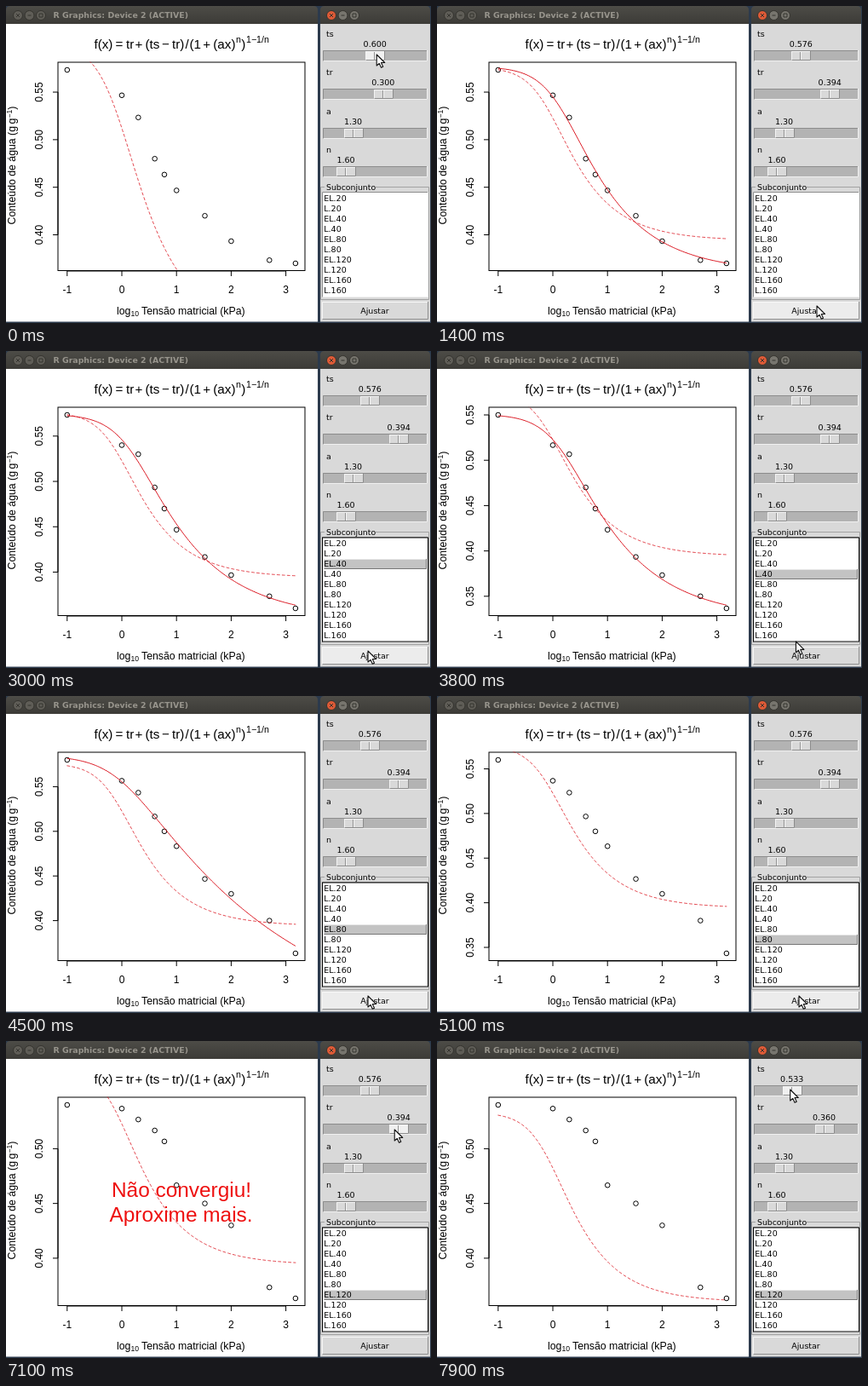
An HTML page that plays this animation: 499 by 372 pixels, repeating every 8 s.

```html
<!DOCTYPE html>
<html lang="pt">
<head>
<meta charset="utf-8">
<title>Ajuste de curva</title>
<style>
  html, body { margin: 0; width: 100%; height: 100%; overflow: hidden; background: #2c3a4c; }
  svg { display: block; width: 100vw; height: 100vh; }
  .plot text { font: 12px "Liberation Sans", Arial, sans-serif; }
  .plot .label { font-size: 12.3px; }
  .plot .small { font-size: 8.6px; }
  .plot .formula { font-size: 15.2px; }
  .plot .formula .sup { font-size: 10.6px; }
  .plot .alert { font-size: 24.4px; fill: #ee1010; }
  .panel text { font: 9.5px "DejaVu Sans", sans-serif; }
  .panel .group { font-size: 9.3px; }
  .title { font: bold 9.4px "DejaVu Sans", sans-serif; fill: #98958d; }
  .mid { text-anchor: middle; }
  .line { fill: none; stroke: #000; }
  .curve { fill: none; stroke: #dc1c26; }
  .dash { stroke-width: .8; stroke-dasharray: 3 3; stroke-linecap: round; }
</style>
</head>
<body>
<svg viewBox="0 0 499 372" xmlns="http://www.w3.org/2000/svg">
  <defs>
    <linearGradient id="bar" x2="0" y2="1">
      <stop stop-color="#4d4c47"/><stop offset="1" stop-color="#3c3b37"/>
    </linearGradient>
    <clipPath id="box"><rect x="61" y="65.500" width="290" height="245"/></clipPath>
  </defs>

  <path d="M0 21V5Q0 0 5 0H361Q366 0 366 5V21Z" fill="url(#bar)"/>
  <text class="title" x="55.500" y="14">R Graphics: Device 2 (ACTIVE)</text>
  <g class="plot">
    <rect y="21" width="366" height="349.500" fill="#fff"/>
    <text class="formula" y="50"><tspan x="103.500">f(x)</tspan><tspan x="128.600">=</tspan><tspan x="141">tr</tspan><tspan x="151.500">+</tspan><tspan x="163.500">(ts</tspan><tspan x="183">−</tspan><tspan x="195">tr)</tspan><tspan x="210.500">/</tspan><tspan x="215.500">(1</tspan><tspan x="231.300">+</tspan><tspan x="243.300">(ax)</tspan><tspan class="sup" x="270" y="43">n</tspan><tspan x="276.300" y="50">)</tspan><tspan class="sup" x="282" y="43">1−1/n</tspan></text>
    <rect class="line" x="61" y="66" width="290" height="244.500"/>
    <g id="xaxis"></g>
    <text class="label" x="130" y="361.700">log<tspan class="small" dy="2.500">10</tspan><tspan dy="-2.500" dx="3">Tensão matricial (kPa)</tspan></text>
    <text class="label" transform="translate(11 256.500) rotate(-90)">Conteúdo de água (g<tspan dx="2.500">g</tspan><tspan class="small" dy="-4.500">−1</tspan><tspan dy="4.500">)</tspan></text>
    <g id="graph"></g>
  </g>

  <g class="panel">
    <path d="M369 21V5Q369 0 374 0H493Q498 0 498 5V21Z" fill="url(#bar)"/>
    <rect x="369" y="21" width="129" height="349.500" fill="#d9d9d9"/>
    <path d="M374 212.500H369.500V344.500H496.500V212.500H434" fill="none" stroke="#a2a2a2"/>
    <text class="group" x="376" y="216">Subconjunto</text>
    <g id="controls"></g>
  </g>
  <g id="buttons"></g>
  <path id="cursor" d="M0 0V13L3 10.300L5.300 15.300L7.500 14.300L5.300 9.500H9.500Z" fill="#fff" stroke="#111" stroke-width="1.100" stroke-linejoin="round"/>
</svg>

<script>
const LOOP = 8000, STEP = 100;
const byId = id => document.getElementById(id);
const range = (n, f) => Array.from({ length: n }, (_, i) => f(i));
const draw = (n, f) => range(n, f).join('');

const rows = [20, 40, 80, 120, 160].flatMap(k => ['EL.' + k, 'L.' + k]);
const tension = [.1, 1, 2, 4, 6, 10, 33, 100, 500, 1500];
// Measured water content in 1/300 for each EL subset; L runs slightly drier.
const water = [
  [172, 164, 157, 144, 139, 134, 126, 118, 112, 111],
  [172, 162, 159, 148, 141, 134, 125, 119, 112, 108],
  [174, 167, 163, 155, 150, 145, 134, 129, 120, 109],
  [162, 161, 158, 155, 152, 140, 135, 129, 112, 109]
].flatMap((set, i) => [set, set.map(v => v - 8 + i)])
 .map(set => set.map(v => v / 300));

// Each subset gets one turn: pick its row, move to the button, fit.
const TURN = 750, LAST = 6;
const turnAt = k => 1100 + TURN * k;
const fitAt = k => k < LAST ? turnAt(k) + 300 : Infinity;
const alertFrom = 6400, alertTo = 7200;

const tsTrack = [[0, .6], [300, .576], [7500, .576], [7900, .533]];
const trTrack = [[400, .3], [700, .394], [7100, .394], [7400, .36]];
const tsX = v => 384 + (v - .4) * 246;
const trX = v => 384 + v * 196;

const drag = (track, i, toX, y, grip) => [track[i][0], toX(track[i][1]) + grip, y];
const cursorTrack = [
  drag(tsTrack, 0, tsX, 57, 2), drag(tsTrack, 1, tsX, 57, 2),
  drag(trTrack, 0, trX, 103, 1), drag(trTrack, 1, trX, 103, 1),
  [1000, 446, 352], [turnAt(0) + 400, 446, 352],
  ...range(LAST, i => i + 1).flatMap(k => {
    const t = turnAt(k);
    return [[t, 400, 226 + 12 * k], [t + 200, 425, 352], [t + 400, 425, 352]];
  }),
  [6300, 425, 352],
  [6900, 456, 104], drag(trTrack, 2, trX, 104, -5), drag(trTrack, 3, trX, 104, -5),
  drag(tsTrack, 2, tsX, 57, -2), drag(tsTrack, 3, tsX, 57, -2)
];

function at(track, t, k = 1) {
  const i = track.findIndex(p => p[0] > t);
  if (i < 0) return track[track.length - 1][k];
  if (!i) return track[0][k];
  const p = track[i - 1], q = track[i];
  return p[k] + (q[k] - p[k]) * (t - p[0]) / (q[0] - p[0]);
}

const shape = (x, a, n) => (1 + (a * x) ** n) ** (1 / n - 1);
const model = (x, p) => p.tr + (p.ts - p.tr) * shape(x, p.a, p.n);

// ts and tr are linear once a and n are given.
function solve(y, u, v) {
  const a = Math.exp(u), n = 1.01 + Math.exp(v);
  const s = tension.map(x => shape(x, a, n));
  const mean = l => l.reduce((p, q) => p + q) / l.length;
  const ms = mean(s), my = mean(y);
  let sxy = 0, sxx = 0;
  s.forEach((si, i) => { sxy += (si - ms) * (y[i] - my); sxx += (si - ms) ** 2; });
  const d = sxy / sxx, tr = my - d * ms;
  const err = s.reduce((e, si, i) => e + (y[i] - tr - d * si) ** 2, 0);
  return { a, n, tr, ts: tr + d, err };
}

// Least squares by a shrinking pattern search.
function fit(y) {
  let u = Math.log(1.3), v = Math.log(.59), best = solve(y, u, v);
  for (let h = .4, k = 0; h > 1e-4 && k < 3000; k++) {
    let found = null;
    for (let i = 0; i < 8; i++) {
      const du = h * Math.cos(i * Math.PI / 4), dv = h * Math.sin(i * Math.PI / 4);
      const p = solve(y, u + du, v + dv);
      if (p.err < best.err) { best = p; found = [u + du, v + dv]; }
    }
    if (found) [u, v] = found; else h /= 2;
  }
  return best;
}
const fits = water.slice(0, LAST).map(fit);

const px = logX => 136 + 64.2 * logX;

function drawGraph(t, set, ts, tr) {
  const y = water[set], lo = Math.min(...y), hi = Math.max(...y);
  const py = v => 302 - 227 * (v - lo) / (hi - lo);
  const curve = (p, cls) => {
    const d = draw(121, i => {
      const lx = -1 + i / 120 * (1 + Math.log10(1500));
      return (i ? 'L' : 'M') + px(lx).toFixed(2) + ' ' + py(model(10 ** lx, p)).toFixed(2);
    });
    return `<path class="curve ${cls}" d="${d}"/>`;
  };
  const ticks = range(7, i => .3 + i * .05).filter(v => py(v) > 66 && py(v) < 311);
  let out = `<path class="line" d="M61 ${py(ticks[0])}V${py(ticks[ticks.length - 1])}"/>`;
  out += ticks.map(v => `<path class="line" d="M55 ${py(v)}h6"/>
    <text class="mid" transform="translate(43.300 ${py(v)}) rotate(-90)">${v.toFixed(2)}</text>`).join('');
  out += tension.map((x, i) =>
    `<circle class="line" cx="${px(Math.log10(x))}" cy="${py(y[i])}" r="2.800"/>`).join('');
  out += `<g clip-path="url(#box)">${curve({ ts, tr, a: 1.3, n: 1.6 }, 'dash')}`;
  if (t >= fitAt(set)) out += curve(fits[set], '');
  out += '</g>';
  if (t >= alertFrom && t < alertTo)
    out += `<text class="alert mid" x="206" y="183">Não convergiu!</text>
      <text class="alert mid" x="205.500" y="211.700">Aproxime mais.</text>`;
  return out;
}

// Raised or sunken box with one-pixel edges.
function bevel(x, y, w, h, fill, light, dark) {
  return `<rect x="${x}" y="${y}" width="${w}" height="${h}" fill="${fill}"/>
    <path fill="none" stroke="${light}" d="M${x + .5} ${y + h}V${y + .5}H${x + w}"/>
    <path fill="none" stroke="${dark}" d="M${x + .5} ${y + h - .5}H${x + w - .5}V${y}"/>`;
}

function slider(i, name, value, cx, mouse) {
  const y = Math.round(53 + i * 45.4);
  const hot = Math.abs(mouse.x - cx) < 11 && mouse.y >= y && mouse.y < y + 12;
  const x = Math.round(cx - 11);
  return `<text x="376" y="${y - 17.5}">${name}</text>
    <text class="mid" x="${cx}" y="${y - 5}">${value}</text>
    ${bevel(372, y - 1, 123, 13, '#b3b3b3', '#8c8c8c', '#f0f0f0')}
    ${bevel(x, y, 23, 11, hot ? '#f0f0f0' : '#d9d9d9', '#f4f4f4', '#8c8c8c')}
    <path d="M${x + 10.5} ${y + 1}v9" stroke="#929292"/><path d="M${x + 11.5} ${y + 1}v9" stroke="#f4f4f4"/>`;
}

function drawControls(set, ts, tr, mouse) {
  const hot = mouse.y >= 347 && mouse.y < 368;
  let out = slider(0, 'ts', ts.toFixed(3), tsX(ts), mouse)
    + slider(1, 'tr', tr.toFixed(3), trX(tr), mouse)
    + slider(2, 'a', '1.30', 407.5, mouse)
    + slider(3, 'n', '1.60', 399, mouse)
    + bevel(371, 218, 125, 124, '#fff', '#8c8c8c', '#f0f0f0');
  if (set) out += '<rect class="line" x="371.500" y="219" width="124" height="122"/>'
    + bevel(373, 220 + 12 * set, 121, 12, '#c3c3c3', '#e6e6e6', '#777');
  out += rows.map((r, i) => `<text x="373.300" y="${229 + 12 * i}">${r}</text>`).join('');
  return out + bevel(371, 347, 125, 21, hot ? '#ececec' : '#d9d9d9', '#f8f8f8', '#8f8f8f')
    + '<text class="mid" x="433" y="360.500">Ajustar</text>';
}

byId('xaxis').innerHTML = `<path class="line" d="M${px(-1)} 311H${px(3)}"/>`
  + draw(5, i => `<path class="line" d="M${px(i - 1)} 311v6"/>
    <text class="mid" x="${px(i - 1)}" y="337">${i - 1}</text>`);

byId('buttons').innerHTML = [0, 368].map(x => draw(3, i => {
  const icon = ['M-2 -2L2 2M2 -2L-2 2', 'M-2 0H2', 'M-2 -2H2V2H-2Z'][i];
  const fill = !x ? '#5f5d57' : i ? '#77756e' : '#df5a36';
  return `<g transform="translate(${x + 14 + i * 13.5} 11)" stroke="#35342f">
    <circle r="5.500" fill="${fill}"/><path d="${icon}" fill="none"/></g>`;
})).join('');

let shown = -1;
function tick() {
  const t = Math.floor(performance.now() % LOOP / STEP) * STEP;
  if (t !== shown) {
    shown = t;
    const set = Math.min(LAST, Math.max(0, Math.floor((t - turnAt(0)) / TURN)));
    const ts = at(tsTrack, t), tr = at(trTrack, t);
    const mouse = { x: at(cursorTrack, t), y: at(cursorTrack, t, 2) };
    byId('graph').innerHTML = drawGraph(t, set, ts, tr);
    byId('controls').innerHTML = drawControls(set, ts, tr, mouse);
    byId('cursor').setAttribute('transform', `translate(${mouse.x} ${mouse.y})`);
  }
  requestAnimationFrame(tick);
}
tick();
</script>
</body>
</html>
```
